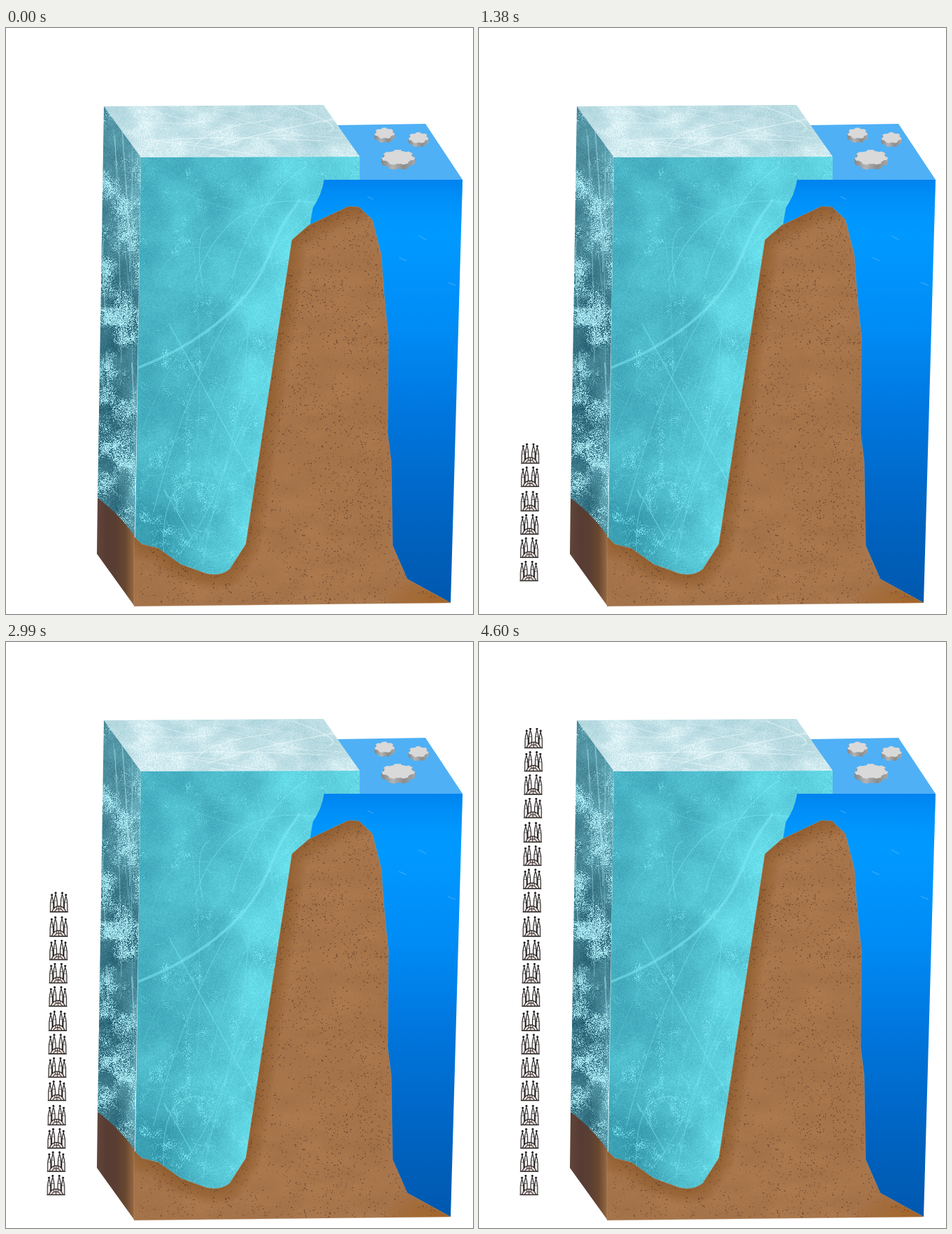
An HTML page with a canvas for the animation above (5.6 s loop, 668 by 838 pixels).

```html
<!DOCTYPE html>
<html lang="en">
<head>
<meta charset="utf-8">
<title>Ice depth in stacked buildings</title>
<style>
html, body { margin: 0; width: 100%; height: 100%; overflow: hidden; background: #fff; }
canvas { display: block; }
</style>
</head>
<body>
<canvas id="stage" width="668" height="838"></canvas>
<script>
const W = 668, H = 838, STEP = 230, LOOP = 5600, COUNT = 20;

const newCanvas = (w, h) => Object.assign(document.createElement('canvas'), { width: w, height: h });
const clamp = v => Math.max(0, Math.min(1, v));
const ramp = (v, from, to) => clamp((v - from) / (to - from));
const mix = (a, b, t) => a.map((v, i) => v + (b[i] - v) * clamp(t));

// Repeatable noise
function hash(x, y) {
  let n = Math.imul(x, 374761393) + Math.imul(y, 668265263);
  n = Math.imul(n ^ n >>> 13, 1274126177);
  return ((n ^ n >>> 16) >>> 0) / 2 ** 32;
}
function noise(x, y) {
  const i = Math.floor(x), j = Math.floor(y);
  const ease = t => t * t * (3 - 2 * t);
  const u = ease(x - i), v = ease(y - j);
  const a = hash(i, j), b = hash(i + 1, j), c = hash(i, j + 1), d = hash(i + 1, j + 1);
  return (a + (b - a) * u) * (1 - v) + (c + (d - c) * u) * v;
}
function fbm(x, y, size) {
  let sum = 0;
  for (let k = 0, amp = .533; k < 4; k++, amp /= 2, size /= 2) sum += amp * noise(x / size + k * 17, y / size);
  return sum;
}

const scene = newCanvas(W, H), g = scene.getContext('2d');

function clipped(path, draw) {
  g.save();
  g.clip(path);
  draw();
  g.restore();
}
function gradient(x0, y0, x1, y1, ...colors) {
  const fill = g.createLinearGradient(x0, y0, x1, y1);
  colors.forEach((color, i) => fill.addColorStop(i / (colors.length - 1), color));
  return fill;
}
function fill(path, style) {
  g.fillStyle = style;
  g.fill(path);
}
// Shades every pixel of a path that lies inside the box
function texture(path, [x0, y0, w, h], shade) {
  const tile = newCanvas(w, h), t = tile.getContext('2d'), img = t.createImageData(w, h);
  for (let i = 0; i < w * h; i++) {
    const x = x0 + i % w, y = y0 + Math.floor(i / w);
    img.data.set([...shade(x, y, hash(x, y)), 255], i * 4);
  }
  t.putImageData(img, 0, 0);
  clipped(path, () => g.drawImage(tile, x0, y0));
}
// Random shallow curves across the box
function scratches(path, [x0, y0, w, h], color, count) {
  clipped(path, () => {
    g.strokeStyle = color;
    for (let i = 0; i < count; i++) {
      const at = k => [x0 + hash(i, k + w) * w, y0 + hash(i, k + h + 9) * h];
      const [a, b] = [at(1), at(2)];
      const bend = (hash(i, 5) - .5) * .3;
      g.lineWidth = .5 + hash(i, 6);
      g.beginPath();
      g.moveTo(...a);
      g.quadraticCurveTo((a[0] + b[0]) / 2 + bend * w, (a[1] + b[1]) / 2 + bend * h, ...b);
      g.stroke();
    }
  });
}

function drawSea() {
  fill(new Path2D('M474 139L600 137 653 217H500V180Z'), '#4fb0f5');
  const front = new Path2D('M420 217H653L636 822 420 800Z');
  fill(front, gradient(0, 300, 0, 822, '#0099ff', '#008bf5', '#0075dc', '#0065c4', '#0058ae'));
  clipped(front, () => {
    g.fillStyle = gradient(0, 217, 0, 300, 'rgba(0,125,235,.8)', 'rgba(0,153,255,0)');
    g.fillRect(420, 217, 240, 83);
  });
  g.strokeStyle = 'rgba(110,195,255,.6)';
  g.stroke(new Path2D('M517 241l8 4M562 328l11 5M590 297l11 6M632 364l11 4'));
}

function drawIce() {
  const top = new Path2D('M140 112L454 110 506 184 193 185Z'), topBox = [140, 110, 367, 76];
  const left = new Path2D('M140 112L193 185 184 740 131 675Z'), leftBox = [131, 112, 63, 630];
  const front = new Path2D('M193 185L506 184V217H455Q452 238 439 257L435 281 425 320 360 790H184Z');
  const frontBox = [184, 184, 323, 606];

  texture(top, topBox, (x, y, grain) => {
    const f = fbm(x, y * 1.6, 40);
    const base = mix([150, 196, 205], [222, 244, 248], .62 + (f - .5) * .9 + (grain - .5) * .35);
    return mix(base, [240, 251, 253], (f + grain * .5 - .9) * 2);
  });
  texture(left, leftBox, (x, y, grain) => {
    const middle = ramp(y, 250, 420), seam = ramp(x, 160, 186) * ramp(y, 430, 620);
    const v = .62 - middle * .38 + seam * .5 + (fbm(x, y, 40) - .5) * .8 + (grain - .5) * .25;
    const frost = fbm(x + 300, y, 26) * 1.4 + grain * .6 - 1.1 + middle * .05;
    return mix(mix([34, 92, 110], [118, 192, 206], v), [172, 236, 246], frost * 3);
  });
  texture(front, frontBox, (x, y, grain) => {
    const side = ramp(x + (y - 303) * .153, 290, 409), deep = ramp(y, 600, 770);
    const v = .52 + side * .34 - deep * .3 * (1 - side) + (fbm(x, y, 50) - .5) * .5 + (grain - .5) * .22;
    const vein = 1 - Math.abs(fbm(x + 90, y, 80) - .5) * 14;
    const frost = fbm(x + 300, y, 16) + grain * .5 - 1.08 + ramp(y, 350, 700) * .1 + clamp(vein) * .08;
    return mix(mix([40, 134, 156], [108, 228, 240], v), [130, 236, 247], frost * 3);
  });
  scratches(top, topBox, 'rgba(248,254,255,.45)', 14);
  scratches(left, leftBox, 'rgba(185,238,247,.5)', 10);
  scratches(front, frontBox, 'rgba(130,236,247,.45)', 24);
  clipped(front, () => {
    g.lineWidth = 4;
    g.strokeStyle = 'rgba(130,236,247,.5)';
    g.stroke(new Path2D('M188 486C270 455 345 400 372 335S398 280 420 245'));
  });
}

function drawRock() {
  const slope = 'M183 727L194 738 218 744 250 767 286 780Q306 785 320 774L343 738 409 303 433 282 490 255 505 256';
  const rock = new Path2D(slope + 'L524 274 537 325Q540 380 547 440L546 580 551 620 553 740 574 788 636 822 183 827Z');
  fill(new Path2D('M131 672Q165 698 184 727V827L130 752Z'),
    gradient(131, 0, 184, 0, '#60443a', '#573c33', '#5a3e33', '#67472f', '#9a6a43'));
  texture(rock, [183, 255, 454, 573], (x, y, grain) =>
    mix([157, 108, 67], [177, 125, 82], .5 + (fbm(x, y * 2, 40) - .5) * .7 + (grain - .5) * .3));
  clipped(rock, () => {
    g.lineCap = 'round';
    g.strokeStyle = 'rgba(112,66,20,.08)';
    for (g.lineWidth = 6; g.lineWidth < 50; g.lineWidth += 8) g.stroke(new Path2D(slope));
    g.fillStyle = gradient(570, 785, 605, 830, 'rgba(160,94,28,0)', 'rgba(160,94,28,.7)');
    g.fillRect(540, 780, 100, 45);
    for (let i = 0; i < 9000; i++) {
      const x = 190 + hash(i, 1) * 440, y = 262 + hash(i, 2) * 560;
      if (fbm(x, y, 28) + hash(i, 3) * .5 < .7) continue;
      const size = .8 + hash(i, 4) * .6;
      g.fillStyle = `rgba(66,44,36,${.4 + hash(i, 5) * .5})`;
      g.fillRect(x, y, size, size);
    }
  });
  g.lineWidth = 1;
  g.strokeStyle = 'rgba(190,160,130,.35)';
  g.stroke(rock);
}

// A lobed slab, extruded downwards
function drawFloe(x, y, rx, ry, depth) {
  const slab = new Path2D(), lobes = 7;
  for (let i = 0; i < lobes * 4; i++) {
    const a = (Math.floor(i / 2) + i % 2 * .85) * Math.PI / lobes;
    const r = i % 4 < 2 ? 1 : .86;
    slab.lineTo(rx * r * Math.cos(a), ry * r * Math.sin(a));
  }
  g.save();
  g.translate(x, y + depth);
  const side = gradient(-rx, 0, rx, 0, '#858585', '#b4b4b4', '#8c8c8c', '#a6a6a6');
  for (let d = 0; d < depth; d += .5) {
    fill(slab, side);
    g.translate(0, -.5);
  }
  fill(slab, '#d9d9d9');
  g.restore();
}

// Four-spired building, 28 by 30
function makeIcon() {
  const scale = 4, icon = newCanvas(28 * scale, 30 * scale), c = icon.getContext('2d');
  c.scale(scale, scale);
  c.strokeStyle = '#181414';
  const paint = (d, color, width = 1.1) => {
    const path = new Path2D(d);
    c.lineWidth = width;
    c.fillStyle = color;
    c.fill(path);
    c.stroke(path);
  };
  const tower = (x, y) => {
    paint(`M${x - 2.2} 28.5V${y + 13}Q${x - 1.8} ${y + 7} ${x} ${y + 2}Q${x + 1.8} ${y + 7} ${x + 2.2} ${y + 13}V28.5Z`, '#f6f2f2');
    paint(`M${x - 2} ${y + 11}h4`, 'none', .5);
    paint(`M${x - 1} ${y}a1 1 0 1 0 2 0a1 1 0 1 0-2 0`, '#181414');
  };
  [[4, 4.5], [9.3, 1.7], [18.7, 1.7], [24, 4.5]].forEach(([x, y]) => tower(x, y));
  paint('M4 28.5Q7 20.5 14 20.5T24 28.5Z', '#efe4e0');
  paint('M8 28.5Q9 24.5 14 24.5T20 28.5M11 21V24.5M14 20.5V28.5M17 21V24.5', 'rgba(0,0,0,0)', .9);
  paint('M.8 28.8H27.2', 'none');
  return icon;
}

drawSea();
drawIce();
drawRock();
drawFloe(541.5, 150.5, 14.5, 8, 6);
drawFloe(590, 157, 14.5, 8, 5.5);
drawFloe(561, 185, 24, 11, 7);

const icon = makeIcon();
const ctx = document.getElementById('stage').getContext('2d');
ctx.imageSmoothingQuality = 'high';

function frame() {
  const shown = Math.min(COUNT, Math.floor(performance.now() % LOOP / STEP));
  ctx.fillStyle = '#fff';
  ctx.fillRect(0, 0, W, H);
  ctx.drawImage(scene, 0, 0);
  for (let i = 0; i < shown; i++) {
    const y = 761.7 - 134.8 * Math.floor(i / 4) - 33.3 * (i % 4);
    ctx.drawImage(icon, 57.5 + .35 * i, y, 28, 30);
  }
  requestAnimationFrame(frame);
}
frame();
</script>
</body>
</html>
```
